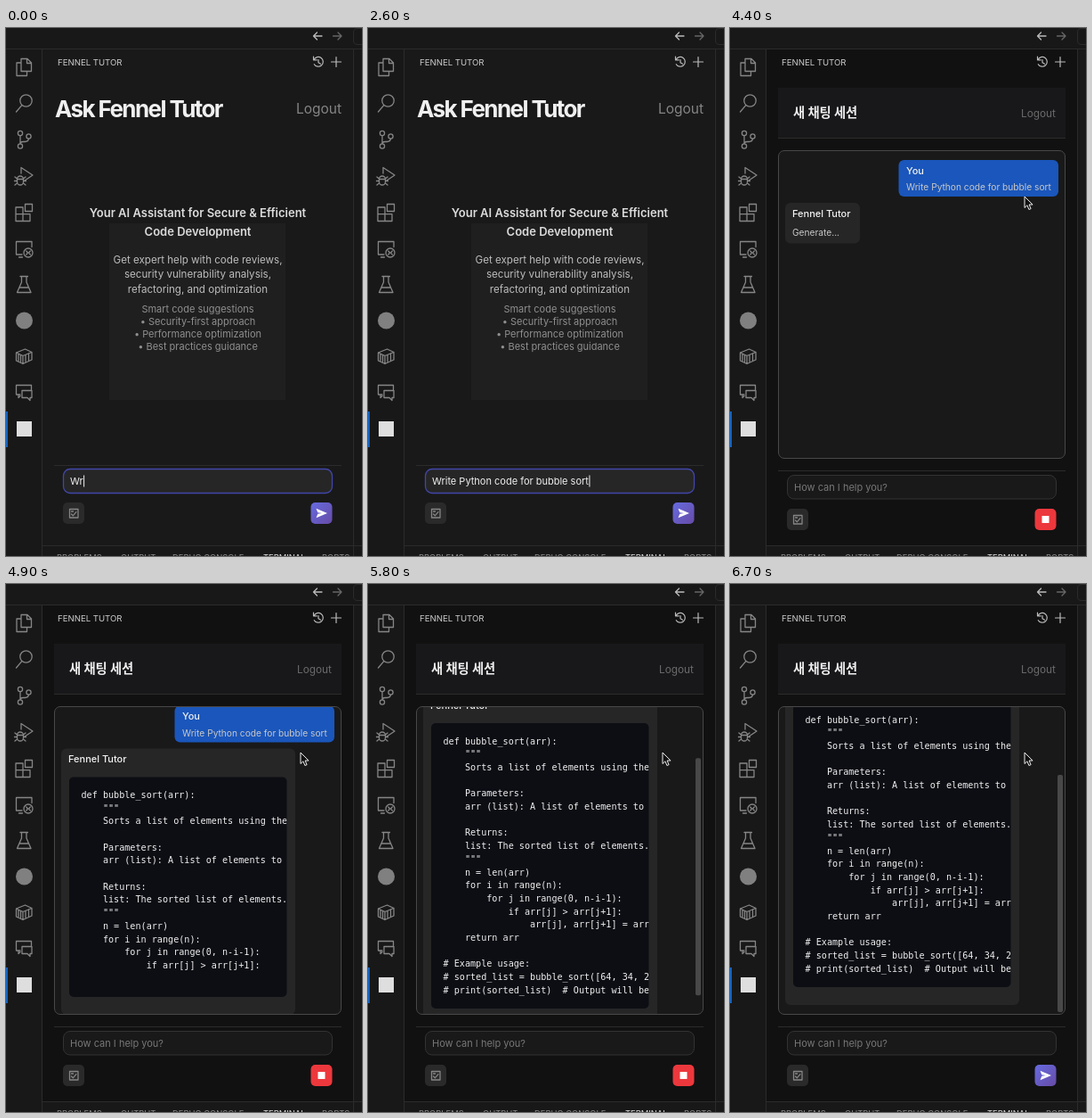
Recreate the animation shown at these times as an HTML page. Size 400 by 592 pixels, loop 6.8 s.

```html
<!DOCTYPE html>
<html lang="en">
<head>
<meta charset="utf-8">
<title>Coding assistant panel</title>
<style>
  html, body { margin: 0; width: 100%; height: 100%; overflow: hidden; background: #181818; }
  #stage { display: block; width: 100vw; height: 100vh; }
  text { font-family: Inter, "Open Sans", sans-serif; fill: #ccc; white-space: pre; }
  .mid { text-anchor: middle; }
  .code text { font: 10.13px "DejaVu Sans Mono", monospace; fill: #f0f0f0; }
  .tabs text { font-size: 9.4px; fill: #8a8a8a; }
  .icon { fill: none; stroke: #868686; stroke-width: 1.3; stroke-linejoin: round; stroke-linecap: round; }
  .rule { fill: none; stroke: #2b2b2b; }
  .lead { font-size: 13px; font-weight: 600; fill: #dcdcdc; }
  .body { font-size: 11.6px; fill: #bdbdbd; }
  .list { font-size: 11px; fill: #8f8f8f; }
  .name { font-size: 11px; font-weight: 500; fill: #f2f2f2; }
  .msg { font-size: 10.2px; fill: #c8c8c8; }
  .field { font-size: 11px; }
</style>
</head>
<body>
<svg id="stage" viewBox="0 0 400 592">
  <defs>
    <linearGradient id="violet" x1="0" y1="0" x2="1" y2="1">
      <stop offset="0" stop-color="#666be0"/>
      <stop offset="1" stop-color="#674ba6"/>
    </linearGradient>
    <g id="send">
      <rect width="24" height="24" rx="5" fill="url(#violet)"/>
      <path d="M6 6.8 18.5 12 6 17.2 7.8 12.8 12.5 12 7.8 11.2Z" fill="#fff"/>
    </g>
    <g id="tasks">
      <rect width="24" height="24" rx="5" fill="#2a2a2a"/>
      <path class="icon" stroke-width="1" d="M7.5 7.5h9.5v9.5h-9.5zM9.5 10h2M9.5 13l1.8 1.8 3.6-4.2"/>
    </g>
  </defs>

  <rect width="400" height="592" fill="#181818"/>

  <!-- welcome view -->
  <g id="welcome">
    <rect x="41" y="24" width="349" height="556" fill="#191919"/>
    <rect x="116" y="219" width="198" height="198" fill="#1f1f1f"/>
    <text x="55" y="100" font-size="26" font-weight="700" letter-spacing="-1.6" style="fill:#f0f0f0">Ask Fennel Tutor</text>
    <text x="326" y="96" font-size="15.5" style="fill:#858585">Logout</text>
    <g class="mid">
      <text class="lead" x="215.5" y="212">Your AI Assistant for Secure &amp; Efficient</text>
      <text class="lead" x="215.5" y="232.500">Code Development</text>
      <text class="body" x="215.5" y="263.500">Get expert help with code reviews,</text>
      <text class="body" x="215.5" y="280.300">security vulnerability analysis,</text>
      <text class="body" x="215.5" y="297">refactoring, and optimization</text>
      <text class="list" x="215.5" y="318.500">Smart code suggestions</text>
      <text class="list" x="215.5" y="332.700">• Security-first approach</text>
      <text class="list" x="215.5" y="347">• Performance optimization</text>
      <text class="list" x="215.5" y="361.300">• Best practices guidance</text>
    </g>
    <path class="rule" stroke="#333" d="M54 490.500H377"/>
    <rect x="64.500" y="494.500" width="302" height="27" rx="7.500" fill="#262626" stroke="#4146a8" stroke-width="1.300"/>
    <text id="typed" class="field" x="72" y="512" style="fill:#f0f0f0"></text>
    <rect id="caret" y="501.500" width="1" height="13" fill="#f0f0f0"/>
    <use href="#tasks" x="64" y="532"/>
    <use href="#send" x="342.500" y="532"/>
  </g>

  <!-- chat view -->
  <g id="chat">
    <rect x="41" y="24" width="349" height="556" fill="#111"/>
    <rect x="54" y="67" width="323" height="56" fill="#18181b"/>
    <path class="rule" d="M54 123.500H377"/>
    <text x="71" y="100" font-size="14.300" font-weight="700" style="font-family:'Noto Sans CJK KR','Noto Sans CJK',sans-serif;fill:#f0f0f0">새 채팅 세션</text>
    <text x="327" y="99.500" font-size="11.800" style="fill:#6a6a6a">Logout</text>
    <rect x="54.500" y="137.500" width="322" height="345" rx="6.500" fill="#191919"/>
    <svg x="55" y="138" width="321" height="344" viewBox="55 138 321 344">
      <g id="thread">
        <rect x="189.500" y="148" width="179.500" height="41" rx="6" fill="#1a56bb"/>
        <text class="name" x="198" y="164">You</text>
        <text class="msg" x="198" y="182.300">Write Python code for bubble sort</text>
        <rect id="bubble" x="62" y="196" rx="6" fill="#262626"/>
        <text class="name" x="70" y="212">Fennel Tutor</text>
        <text id="wait" class="msg" x="70" y="232.500">Generate...</text>
        <g id="answer">
          <rect id="box" x="71" y="228" width="244.500" rx="5" fill="#0d0e14"/>
          <svg id="lines" class="code" x="71" y="228" width="244.500" height="320"></svg>
        </g>
      </g>
      <rect id="thumb" x="368" width="6" rx="2" fill="#484848"/>
    </svg>
    <rect x="54.500" y="137.500" width="322" height="345" rx="6.500" fill="none" stroke="#484848"/>
    <path class="rule" d="M54 496.500H377"/>
    <rect x="64.500" y="501.500" width="302" height="26.500" rx="7.500" fill="#191919" stroke="#333"/>
    <text class="field" x="72" y="519" style="fill:#777">How can I help you?</text>
    <use href="#tasks" x="64" y="539"/>
    <use id="ready" href="#send" x="342.500" y="539"/>
    <g id="stop">
      <rect x="342.500" y="539" width="24" height="24" rx="5" fill="#ec383d"/>
      <rect x="350.500" y="547" width="8" height="8" rx=".5" fill="#fff"/>
    </g>
    <path id="pointer" d="M331 189v12.500l2.900-2.700 2 4.700 2.200-.9-2-4.600h4z" fill="#111" stroke="#eee" stroke-linejoin="round"/>
  </g>

  <!-- window frame -->
  <path class="rule" d="M0 23.500H400M40.500 24V592M390.500 24V592M41 580.500H400"/>
  <path class="rule" stroke="#444" d="M400 .5h-5q-4.500 0-4.500 4.500v9q0 4.500 4.500 4.500h5"/>
  <text x="58" y="42" font-size="9.600">FENNEL TUTOR</text>
  <g class="icon">
    <path stroke="#bbb" d="M355 9h-9.500m4-4-4 4 4 4"/>
    <path stroke="#666" d="M367.500 9h9.500m-4-4 4 4-4 4"/>
    <g style="stroke:#bbb" stroke-width="1.200">
      <path d="M346 35.500a5.400 5.400 0 1 1 .3 5.200M345.500 32v3.800h3.800M351 35.500v3.300l2.500 1.400"/>
      <path d="M371 32.500v11M365.500 38h11"/>
    </g>
  </g>
  <g class="tabs">
    <text x="57" y="596.500">PROBLEMS</text>
    <text x="129" y="596.500">OUTPUT</text>
    <text x="187" y="596.500">DEBUG CONSOLE</text>
    <text x="289" y="596.500" style="fill:#ddd">TERMINAL</text>
    <text x="355" y="596.500">PORTS</text>
  </g>

  <!-- activity bar -->
  <g class="icon">
    <path d="M17 34.500h7l4.500 4.500v9.500H17zM23.500 34.500v5h5M17 39h-5v14.500h11.500v-5"/>
    <path d="M17.800 86.700 11.500 94"/><circle cx="22.500" cy="81.500" r="6.700"/>
    <g><circle cx="16" cy="118" r="2.600"/><circle cx="25.500" cy="121.500" r="2.600"/><circle cx="16" cy="132.500" r="2.600"/>
      <path d="M16 120.700v9M25.500 124.200q-.5 3.300-4 3.300h-2.500q-3 0-3 2.200"/></g>
    <path d="M17 163v-6.500l13 8.500-9 6"/>
    <path d="M12.500 169.500a3.500 3.500 0 0 1 7 0v3a3.500 3.500 0 0 1-7 0zM12.500 169.500h7M10 167l2.500 2M22 167l-2.500 2M9.500 171.500h3M19.500 171.500h3M10 176l2.500-2M22 176l-2.500-2"/>
    <path d="M11 201h8v15.500h-8zM11 208.700h16v7.800h-16M21.500 197.500h8v8h-8z"/>
    <path d="M18 254H11.500v-14.500h17.500v6M14.500 257h4"/><circle cx="25" cy="252" r="5"/><path d="m22.800 250 1.700 2-1.700 2M27.300 250l-1.700 2 1.700 2"/>
    <path d="M16 278.500h8.500M17.500 278.500v6.500l-5 11.500h15.500l-5-11.500v-6.500M15 291h10.500"/>
    <path d="m11.500 364 10-4 7.500 3.500v8.500l-10 4.500-7.500-3.500zM11.500 364l7.500 3.500 10-4M19 367.500v9M22 366.500v8M25.500 365v8M14 365.500v8M16.500 366.500v8"/>
    <path d="M16 411h-4.500v-10.500h17v5M18 406.500h11v8h-2v3l-3-3h-6zM14 411v3.500l2-2"/>
  </g>
  <circle cx="20.500" cy="328" r="9.500" fill="#808080"/>
  <rect x="12" y="441" width="17" height="17" fill="#dedede"/>
  <rect y="430" width="2" height="40" fill="#1264c4"/>
</svg>

<script>
const LOOP = 6800, STEP = 100, LINE = 14.7;
const VIEW_TOP = 139, VIEW_H = 343;
const PROMPT = "Write Python code for bubble sort";
const CODE = `def bubble_sort(arr):
    """
    Sorts a list of elements using the bubble sort algorithm.

    Parameters:
    arr (list): A list of elements to be sorted.

    Returns:
    list: The sorted list of elements.
    """
    n = len(arr)
    for i in range(n):
        for j in range(0, n-i-1):
            if arr[j] > arr[j+1]:
                arr[j], arr[j+1] = arr[j+1], arr[j]
    return arr

# Example usage:
# sorted_list = bubble_sort([64, 34, 25, 12, 22, 11, 90])
# print(sorted_list)  # Output will be [11, 12, 22, 25, 34, 64, 90]`;

// [time, value] points, joined by straight lines
const TYPING = [[0, 2], [1100, 14], [2500, PROMPT.length]];
const STREAM = [[4400, 0], [4800, 310], [5300, 459], [5700, CODE.length]];
const SCROLL = [[4800, 0], [5300, 58], [6300, 86], [6700, 96]];

const $ = id => document.getElementById(id);
const show = (id, on) => { $(id).style.display = on ? "" : "none"; };
const set = (id, attrs) => {
  for (const key in attrs) $(id).setAttribute(key, attrs[key]);
};

function at(points, t) {
  if (t <= points[0][0]) return points[0][1];
  for (let i = 1; i < points.length; i++) {
    const [t0, v0] = points[i - 1], [t1, v1] = points[i];
    if (t <= t1) return v0 + (v1 - v0) * (t - t0) / (t1 - t0);
  }
  return points[points.length - 1][1];
}

const rows = CODE.split("\n").map((_, i) => {
  const row = document.createElementNS("http://www.w3.org/2000/svg", "text");
  row.setAttribute("x", 13.5);
  row.setAttribute("y", 23.5 + i * LINE);
  return $("lines").appendChild(row);
});

function drawWelcome(t) {
  $("typed").textContent = PROMPT.slice(0, Math.floor(at(TYPING, t) + 1e-6));
  set("caret", { x: 72.5 + $("typed").getComputedTextLength() });
}

function drawChat(t) {
  const busy = t >= 2900 && t < 5900;
  show("thread", t >= 2900);
  show("stop", busy);
  show("ready", !busy);
  show("pointer", t >= 3600);

  const chars = Math.floor(at(STREAM, t));
  const shown = CODE.slice(0, chars).split("\n");
  rows.forEach((row, i) => { row.textContent = shown[i] || ""; });
  show("wait", !chars);
  show("answer", chars);

  const boxH = shown.length * LINE + 26;
  const bubbleH = chars ? boxH + 52 : 45.5;
  set("box", { height: boxH });
  set("bubble", { width: chars ? 263 : 84, height: bubbleH });

  const limit = Math.max(0, 196 + bubbleH + 10 - VIEW_TOP - VIEW_H);
  const scroll = Math.min(limit, at(SCROLL, t));
  const ratio = VIEW_H / (VIEW_H + limit);
  set("thread", { transform: `translate(0 ${-scroll})` });
  set("thumb", { y: VIEW_TOP + scroll * ratio, height: VIEW_H * ratio - 2 });
  show("thumb", t >= 5000);
}

const start = performance.now();
function draw() {
  const t = Math.floor((performance.now() - start) % LOOP / STEP) * STEP;
  const chatting = t >= 2700;
  show("welcome", !chatting);
  show("chat", chatting);
  (chatting ? drawChat : drawWelcome)(t);
  requestAnimationFrame(draw);
}
draw();
</script>
</body>
</html>
```
